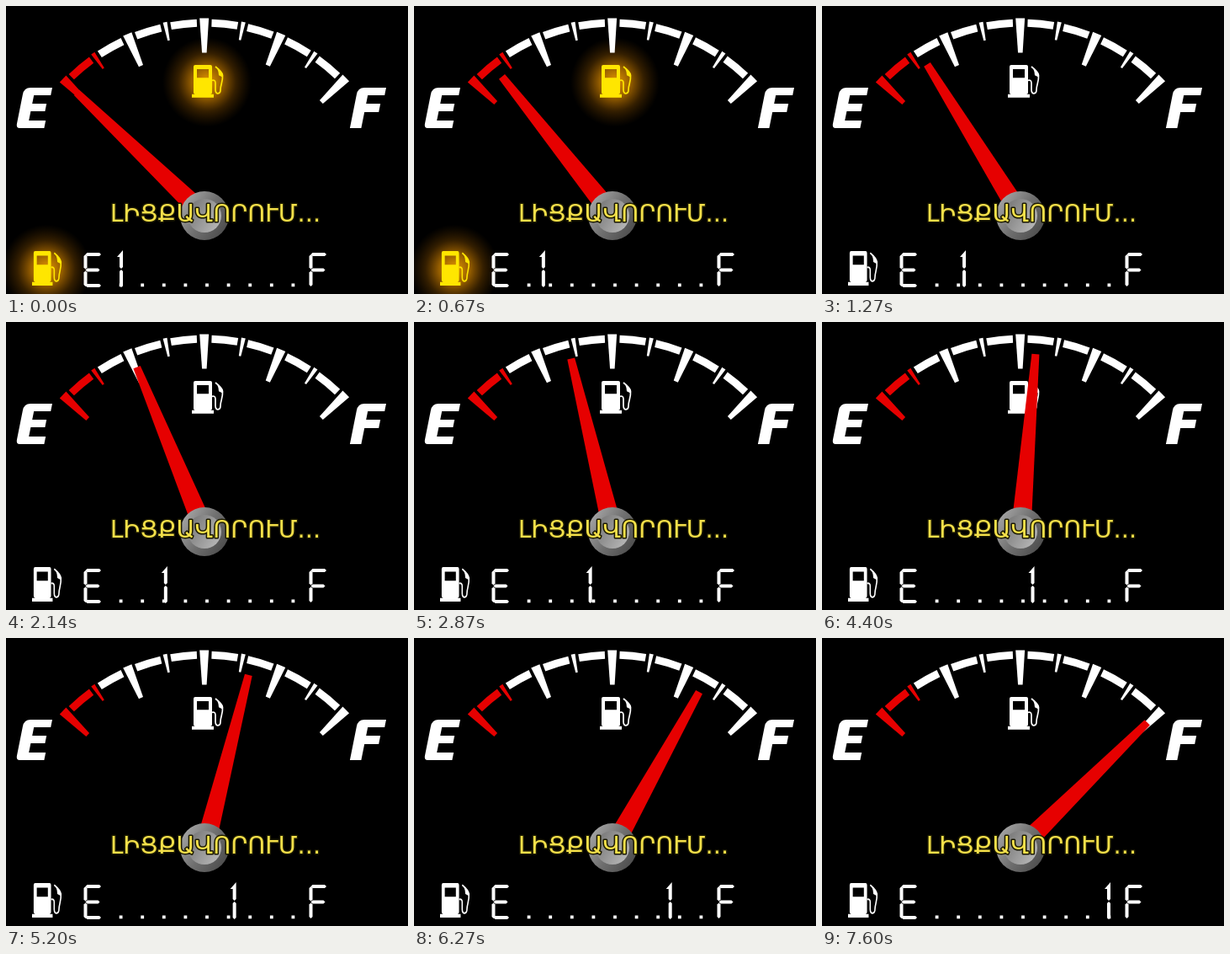
These frames come from a looping animation (478x342 px, 7670 ms). An HTML page with a canvas:

```html
<!DOCTYPE html>
<html lang="hy">
<head>
<meta charset="utf-8">
<title>Fuel gauge</title>
<style>
html, body { margin: 0; width: 100%; height: 100%; overflow: hidden; background: #000; }
canvas { display: block; }
</style>
</head>
<body>
<canvas id="stage" width="478" height="342"></canvas>
<script>
const ctx = document.getElementById('stage').getContext('2d');
const LOOP = 7670, FPS = 15;
const CX = 236.5, CY = 248.5, RAD = Math.PI / 180;
const WHITE = '#fff', RED = '#e60000', LIT = '#ffe600';
const GLOW_END = 16;   // step at which the warning lamps go out
const HOLDS = [28, 101];
// needle progress: [step, value]
const PACE = [[0, 0], [19, .157], [32, .259], [54, .453], [78, .66], [94, .822], [113, 1]];

function progress(step) {
  if (HOLDS.includes(step)) step--;
  for (let i = 1; i < PACE.length; i++) {
    const [a, p] = PACE[i - 1], [b, q] = PACE[i];
    if (step <= b) return p + (q - p) * (step - a) / (b - a);
  }
  return 1;
}

function poly(points, color) {
  ctx.fillStyle = color;
  ctx.beginPath();
  points.forEach(([x, y]) => ctx.lineTo(x, y));
  ctx.closePath();
  ctx.fill();
}

// tapered bar along a radius of the dial
function spoke(deg, r0, r1, w0, w1, color) {
  ctx.save();
  ctx.translate(CX, CY);
  ctx.rotate(deg * RAD);
  poly([[-w0 / 2, -r0], [-w1 / 2, -r1], [w1 / 2, -r1], [w0 / 2, -r0]], color);
  ctx.restore();
}

function band(from, to, color) {
  ctx.strokeStyle = color;
  ctx.lineWidth = 9;
  ctx.beginPath();
  ctx.arc(CX, CY, 228.5, (from - 90) * RAD, (to - 90) * RAD);
  ctx.stroke();
}

function drawScale() {
  for (let i = 0; i < 5; i++) {
    const deg = (i - 2) * 23 - .2;
    const color = i ? WHITE : RED;
    spoke(deg, 193, 234, 5.5, 11, color);
    if (i === 4) break;
    const mid = deg + 11.5;
    spoke(mid, 212, 234, 2.5, 5, color);
    band(deg + 2.2, mid - 1.5, color);
    band(mid + 1.5, deg + 20.8, WHITE);
  }
}

function drawLetter(x, isE) {
  ctx.save();
  ctx.transform(1, 0, -.2, 1, x, 97);
  ctx.fillStyle = WHITE;
  ctx.beginPath();
  ctx.moveTo(42, 0);
  ctx.lineTo(16, 0);
  ctx.quadraticCurveTo(8.5, 0, 8.5, 8);
  if (isE) {
    ctx.lineTo(8.5, 43);
    ctx.quadraticCurveTo(8.5, 48, 13, 48);
    [[42, 48], [42, 39], [22, 39], [22, 28], [39, 28]].forEach(p => ctx.lineTo(...p));
  } else {
    [[8.5, 48], [22, 48], [22, 29], [39, 29]].forEach(p => ctx.lineTo(...p));
  }
  [[39, 19], [22, 19], [22, 9], [42, 9]].forEach(p => ctx.lineTo(...p));
  ctx.closePath();
  ctx.fill();
  ctx.restore();
}

function drawGlow(x, y, r) {
  const g = ctx.createRadialGradient(x, y, 0, x, y, r);
  g.addColorStop(0, 'rgba(255,170,0,.9)');
  g.addColorStop(.35, 'rgba(255,160,0,.58)');
  g.addColorStop(.65, 'rgba(220,130,0,.24)');
  g.addColorStop(1, 'rgba(160,90,0,0)');
  ctx.fillStyle = g;
  ctx.fillRect(x - r, y - r, 2 * r, 2 * r);
}

function drawPump(x, y, sx, sy, lit) {
  if (lit) drawGlow(x + 18 * sx, y + 20 * sy, 53);
  const color = lit ? LIT : WHITE;
  ctx.save();
  ctx.translate(x, y);
  ctx.scale(sx, sy);
  ctx.fillStyle = color;
  ctx.beginPath();
  ctx.roundRect(2, 0, 22, 34, 2);
  ctx.rect(0, 34, 26, 4);
  ctx.rect(6, 5, 14, 10);
  ctx.fill('evenodd');
  ctx.strokeStyle = color;
  ctx.lineWidth = 1.7;
  ctx.lineJoin = 'round';
  ctx.beginPath();
  ctx.moveTo(24, 18);
  ctx.quadraticCurveTo(28, 17, 28, 21);
  ctx.lineTo(28, 29);
  ctx.bezierCurveTo(28, 35, 34, 34, 34, 29);
  ctx.bezierCurveTo(34, 23, 37, 20, 36.5, 12);
  ctx.quadraticCurveTo(36, 8, 28, 2);
  ctx.stroke();
  poly([[30, 4], [33, 6], [37, 12], [36, 14], [32, 12], [31.5, 8]], color);
  ctx.restore();
}

// pointed display segment
function segment(x0, y0, x1, y1) {
  const dx = x1 - x0, dy = y1 - y0, len = Math.hypot(dx, dy);
  const ux = dx / len * 2, uy = dy / len * 2;
  poly([[x0, y0], [x0 + ux - uy, y0 + uy + ux], [x1 - ux - uy, y1 - uy + ux],
    [x1, y1], [x1 - ux + uy, y1 - uy - ux], [x0 + ux + uy, y0 + uy - ux]], WHITE);
}

function drawDigit(x, isE) {
  segment(x + 2, 295, x + 20.5, 295);
  segment(x + 2, 313.5, x + 19, 313.5);
  segment(x + 2, 295, x + 2, 312.5);
  segment(x + 2, 314.5, x + 2, 333);
  if (isE) segment(x + 2, 332, x + 20.5, 332);
}

function drawReadout(p) {
  drawDigit(92.5, true);
  drawDigit(360.5, false);
  ctx.fillStyle = WHITE;
  for (let i = 0; i < 9; i++) ctx.fillRect(134.7 + i * 25.6, 329.5, 3.8, 3.8);
  const x = 137 + 204 * p;
  poly([[x + 2, 290], [x + 2, 310], [x, 312], [x - 2, 310], [x - 2, 298], [x - 5, 298]], WHITE);
  segment(x, 313, x, 334);
}

function drawHub() {
  const rim = ctx.createLinearGradient(CX - 24, CY - 16, CX + 24, CY + 16);
  rim.addColorStop(0, '#a0a0a0');
  rim.addColorStop(.5, '#707070');
  rim.addColorStop(1, '#505050');
  const face = ctx.createLinearGradient(CX - 17, CY - 10, CX + 17, CY + 10);
  face.addColorStop(0, '#7c7c7c');
  face.addColorStop(1, '#b4b4b4');
  [[29, rim], [20, face]].forEach(([r, fill]) => {
    ctx.fillStyle = fill;
    ctx.beginPath();
    ctx.arc(CX - .5, CY + .5, r, 0, 2 * Math.PI);
    ctx.fill();
  });
}

function drawCaption() {
  ctx.font = '28.8px "DejaVu Sans", sans-serif';
  ctx.textAlign = 'center';
  ctx.lineJoin = 'round';
  ctx.lineWidth = 3;
  ctx.strokeStyle = '#1c1a00';
  ctx.fillStyle = '#f4e04a';
  ctx.strokeText('ԼԻՑՔԱՎՈՐՈՒՄ...', 249, 256);
  ctx.fillText('ԼԻՑՔԱՎՈՐՈՒՄ...', 249, 256);
}

function draw(time) {
  const step = Math.floor(time % LOOP * FPS / 1000);
  const p = progress(step), lit = step < GLOW_END;
  ctx.fillStyle = '#000';
  ctx.fillRect(0, 0, 478, 342);
  drawPump(221, 70, 1, 1.02, lit);
  drawPump(31, 291, .94, 1.08, lit);
  drawScale();
  drawLetter(13, true);
  drawLetter(410, false);
  spoke(-46.3 + 91.7 * p, 0, 211, 24, 9, RED);
  drawHub();
  drawCaption();
  drawReadout(p);
}

const start = performance.now();
function tick() {
  draw(performance.now() - start);
  requestAnimationFrame(tick);
}
tick();
</script>
</body>
</html>
```
